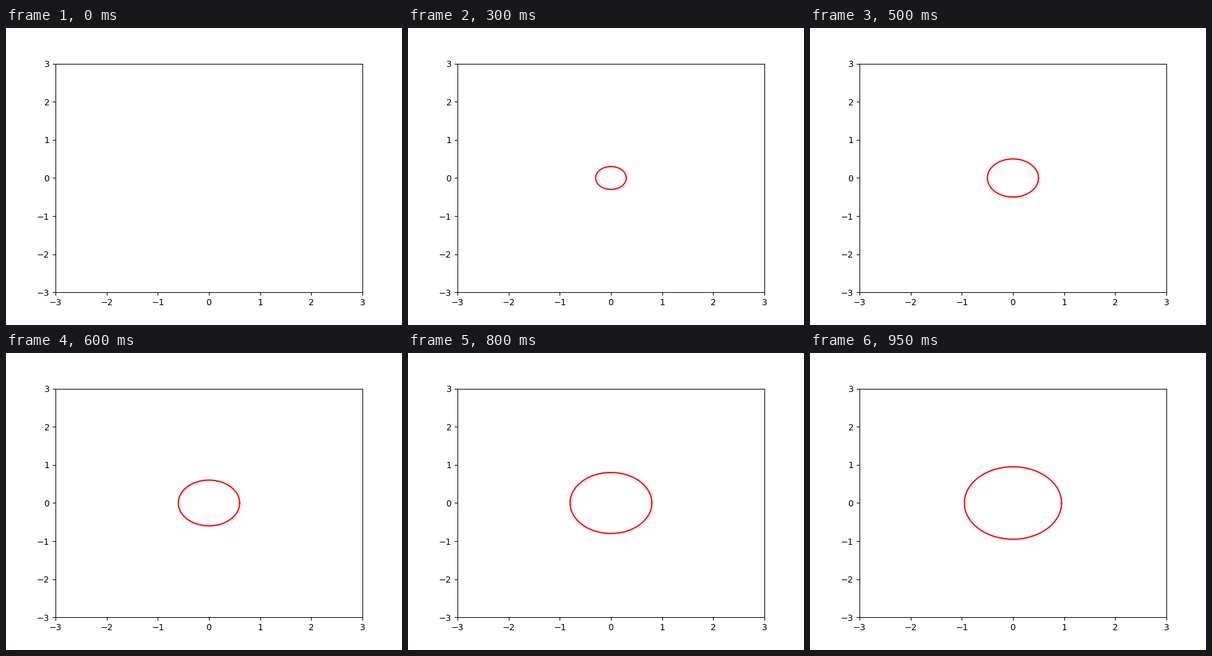
A matplotlib script for the animation above (1000 ms loop, 640 px wide and 480 px high).

```python
import numpy as np
import matplotlib.pyplot as plt
from matplotlib.animation import FuncAnimation

FRAMES = 20
INTERVAL = 50  # ms
RADIUS_STEP = 0.05

plt.rcParams["font.family"] = "DejaVu Sans"

fig, ax = plt.subplots(figsize=(6.4, 4.8), dpi=100)
ax.set_xlim(-3, 3)
ax.set_ylim(-3, 3)
circle, = ax.plot([], [], color="red", linewidth=1.5)

theta = np.linspace(0, 2 * np.pi, 100)


def update(frame):
    radius = RADIUS_STEP * frame
    if frame == 0:
        circle.set_data([], [])
    else:
        circle.set_data(radius * np.cos(theta), radius * np.sin(theta))
    return circle,


anim = FuncAnimation(fig, update, frames=FRAMES, interval=INTERVAL,
                     init_func=lambda: update(0), repeat=True, repeat_delay=0)
plt.show()
```
